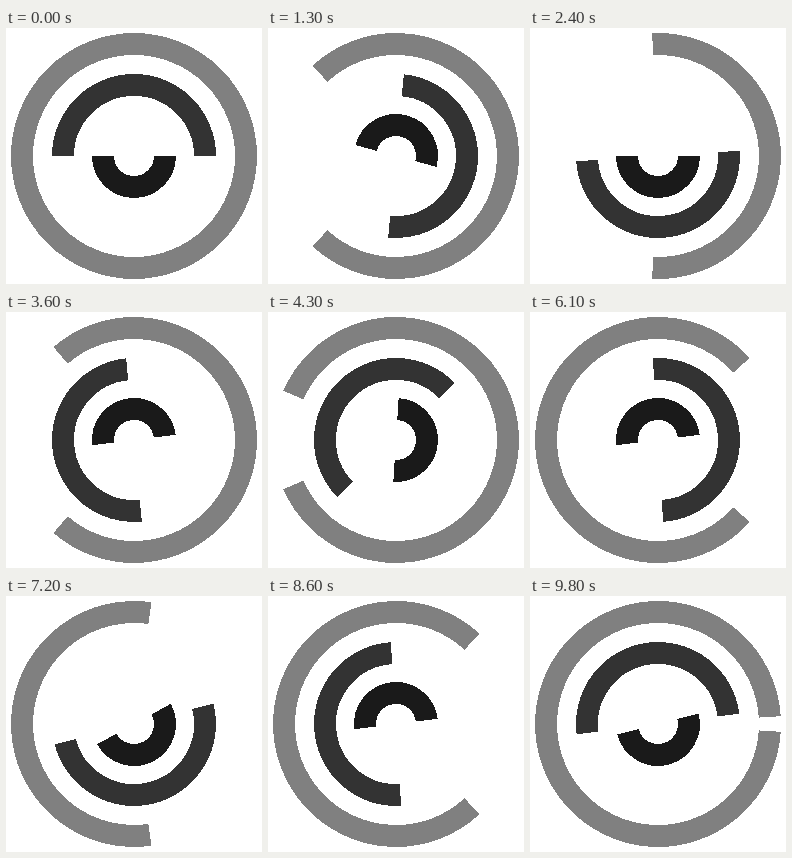
Recreate the animation shown at these times as an HTML page. Size 256x256 px, loop 9.9 s.

```html
<!DOCTYPE html>
<html lang="en">
<head>
<meta charset="utf-8">
<title>Turning arcs</title>
<style>
  html, body { margin: 0; width: 100%; height: 100%; overflow: hidden; background: #fff; }
  svg { display: block; fill: none; stroke-width: 22; shape-rendering: crispEdges; }
</style>
</head>
<body>
<svg width="256" height="256" viewBox="-128 -128 256 256">
  <path id="outerTop" d="M-112 0A112 112 0 0 1 112 0" stroke="#808080"/>
  <path id="outerBottom" d="M-112 0A112 112 0 0 1 112 0" stroke="#808080"/>
  <path id="middle" d="M-71 0A71 71 0 0 1 71 0" stroke="#333"/>
  <path id="inner" d="M-31 0A31 31 0 0 1 31 0" stroke="#1a1a1a"/>
</svg>
<script>
const STEPS = 99, STEP_MS = 100;

// Angle of an arc making `turns` laps per loop; each lap begins on a whole step.
function lapAngle(step, turns) {
  const lapStart = lap => Math.floor(STEPS * lap / turns);
  let lap = 0;
  while (step >= lapStart(lap + 1)) lap++;
  return 360 * (step - lapStart(lap)) / (lapStart(lap + 1) - lapStart(lap));
}

function turn(id, angle) {
  document.getElementById(id).setAttribute('transform', `rotate(${angle})`);
}

function draw(step) {
  // The outer halves turn against each other.
  turn('outerTop', lapAngle(step, 1));
  turn('outerBottom', 180 - lapAngle(step, 1));
  turn('middle', lapAngle(step, 2));
  turn('inner', 180 + lapAngle(step, 4));
}

function tick() {
  draw(Math.floor(performance.now() / STEP_MS) % STEPS);
  requestAnimationFrame(tick);
}
tick();
</script>
</body>
</html>
```
